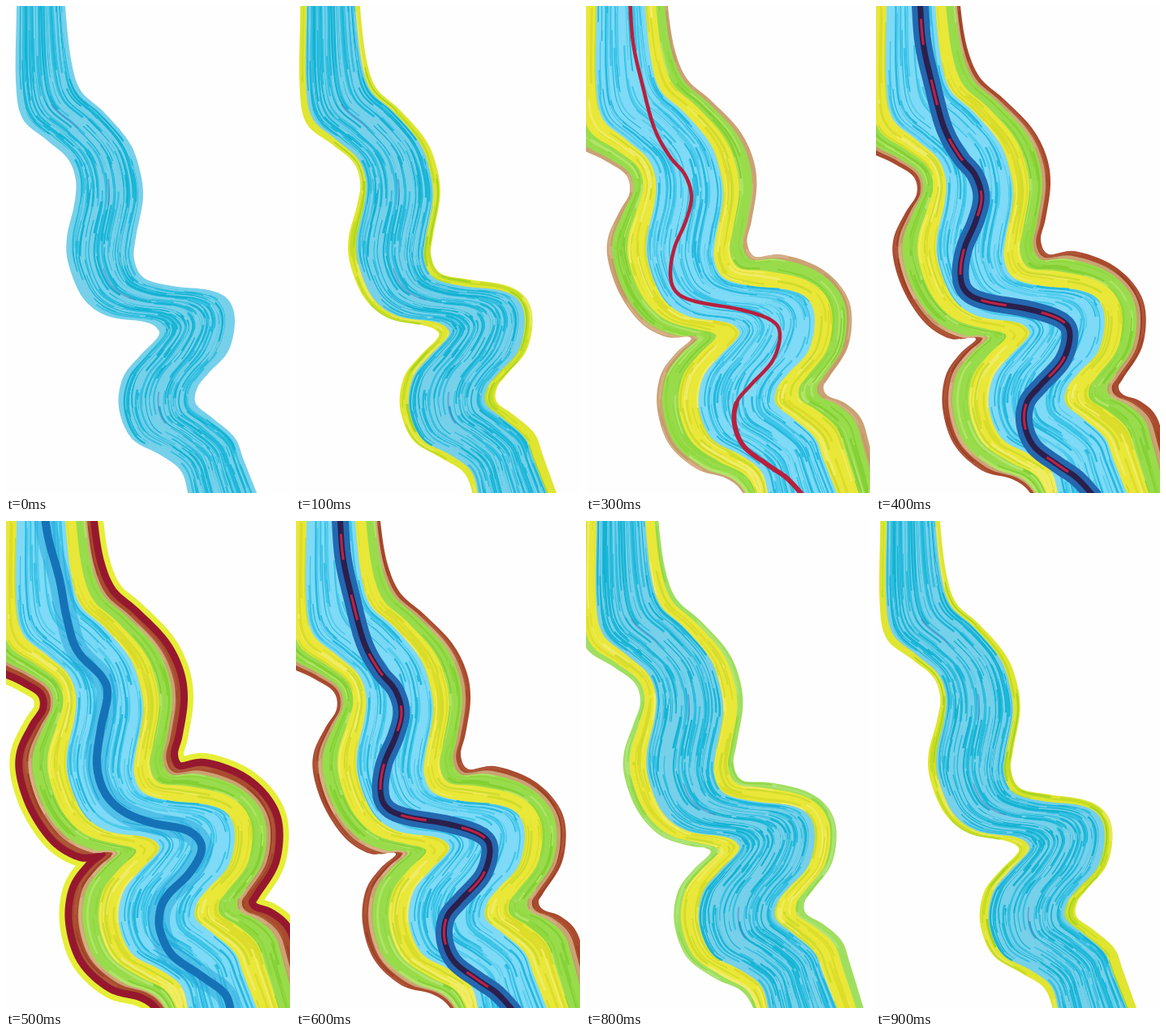
Recreate the animation shown at these times as an HTML page with a canvas. Size 350 px wide and 600 px high, loop 1000 ms.

```html
<!DOCTYPE html>
<html>
<head>
<meta charset="utf-8">
<style>
html, body { margin: 0; height: 100%; overflow: hidden; background: #fefefe; }
canvas { display: block; }
</style>
</head>
<body>
<canvas id="stage" width="350" height="600"></canvas>
<script>
const W = 350, H = 600;

// Smooth curve through x,y pairs, sampled at 8 steps per span.
function curve(...n) {
  const p = [], out = [];
  for (let i = 0; i < n.length; i += 2) p.push([n[i], n[i + 1]]);
  const last = p.length - 1;
  for (let i = 0; i < last; i++) {
    const a = p[Math.max(i - 1, 0)], b = p[i], c = p[i + 1], d = p[Math.min(i + 2, last)];
    for (let k = 0; k < 8; k++) {
      const t = k / 8;
      out.push([0, 1].map(j => b[j] + t / 2 * (c[j] - a[j] +
        t * (2 * a[j] - 5 * b[j] + 4 * c[j] - d[j] + t * (3 * (b[j] - c[j]) + d[j] - a[j])))));
    }
  }
  out.push(p[last]);
  return out;
}

// River banks and the matching points on the outer rim of the land.
const left = curve(12,-40, 13,0, 12,90, 20,138, 50,165, 76,188, 86,215, 84,245, 75,285, 77,318,
  95,360, 125,382, 170,389, 186,397, 187,408, 164,432, 144,458, 139,495, 155,533, 190,553,
  215,572, 224,600, 228,640);
const right = curve(72,-40, 73,0, 80,65, 92,104, 120,130, 150,165, 163,195, 169,235, 160,285, 158,312,
  170,335, 205,345, 250,350, 274,362, 282,388, 274,425, 250,452, 236,470, 234,490, 255,508,
  282,532, 294,562, 325,640);
const leftRim = curve(-28,-40, -28,20, -28,130, -18,172, 20,193, 46,210, 50,232, 36,255, 22,285, 22,315,
  36,355, 62,392, 92,410, 112,408, 123,411, 104,428, 86,455, 82,495, 96,540, 130,572,
  168,583, 190,600, 210,640);
const rightRim = curve(102,-40, 104,0, 112,50, 128,88, 158,115, 192,150, 210,185, 215,220, 209,262, 203,288,
  213,306, 245,302, 288,317, 318,343, 332,375, 328,420, 305,458, 299,469, 305,479, 326,487,
  345,505, 356,540, 380,640);
const thread = curve(54,-10, 58,45, 69,95, 84,150, 103,185, 122,208, 130,235, 123,265, 109,298, 104,330,
  111,352, 135,364, 190,374, 228,387, 239,405, 230,437, 203,467, 186,488, 183,515, 195,543,
  225,566, 248,582, 270,606);
const channel = curve(47,-10, 53,25, 66,72, 75,120, 88,160, 118,192, 125,215, 117,255, 112,300, 122,335,
  145,358, 180,372, 220,380, 238,393, 240,410, 225,435, 200,460, 190,480, 190,505, 205,535,
  240,560, 270,583, 278,610);

const yellow = ['#e9e738', '#dcdc2a', '#f0ec66', '#cfdc2c'];
const green = ['#98dc4c', '#84d034', '#b2e468', '#8ed83e'];
const paleGreen = ['#9fdf60', '#92d848', '#aee478'];
const lime = ['#dfe530', '#a4d422', '#e8e858', '#c4dc24'];
const tan = ['#cba274', '#c4986a', '#d6b084'];
const brown = ['#a94b2e', '#9e4028', '#b0563a'];
const land = [[.43, yellow], [.78, green]];

// Each scene: land bands from the water outwards, water colours, extras.
const deep = ['#76d0ea', '#14b2d2', '#1cb8da', '#36bfe0'];
const bright = ['#7edaf6', '#26b8de', '#3cc4e8', '#52ccec'];
const scenes = [
  { bands: [], water: deep, margin: .08, count: 430 },
  { bands: [[.19, lime]], water: deep, margin: .03, count: 430 },
  { bands: [[.38, yellow], [.53, paleGreen]], water: deep, margin: .03, count: 380 },
  { bands: [...land, [.9, tan]], water: bright, margin: .03, count: 330 },
  { bands: [...land, [.87, tan], [1, brown]], water: bright, margin: .03, count: 270 },
  { bands: [...land, [.87, tan], [1, brown]], water: bright, margin: .03, count: 270,
    rims: [[16, '#e6ee36'], [9, '#96182f']] }
];

let seed;
const rnd = () => (seed = seed * 16807 % 2147483647) / 2147483647;
const pick = a => a[Math.floor(rnd() * a.length)];
const mix = (a, b, t, from = 0, to = a.length, drift = 0) =>
  a.slice(from, to).map((p, i) => {
    const u = t + drift * i, q = b[i + from];
    return [p[0] + (q[0] - p[0]) * u, p[1] + (q[1] - p[1]) * u];
  });

function trace(g, pts) {
  g.beginPath();
  for (const p of pts) g.lineTo(p[0], p[1]);
}

function line(g, pts, color, width) {
  trace(g, pts);
  g.strokeStyle = color;
  g.lineWidth = width;
  g.stroke();
}

function shape(g, t, color) {
  trace(g, [...mix(left, leftRim, t), ...mix(right, rightRim, t).reverse()]);
  g.closePath();
  g.fillStyle = color;
  g.fill();
}

// Short pen strokes that follow the flow between two edges.
function strokes(g, a, b, lo, hi, colors, count, size) {
  for (let i = 0; i < count; i++) {
    const from = Math.floor(rnd() * (a.length + 10)) - 10;
    const to = from + 7 + Math.floor(rnd() * 17);
    const t = lo + rnd() * (hi - lo);
    const drift = (rnd() - .5) * .003;
    line(g, mix(a, b, t, Math.max(from, 0), to, drift), pick(colors), size * (.6 + rnd() * .8));
  }
}

function paint(s, k) {
  const c = document.createElement('canvas');
  c.width = W;
  c.height = H;
  const g = c.getContext('2d');
  g.lineJoin = 'round';
  g.fillStyle = '#fefefe';
  g.fillRect(0, 0, W, H);
  seed = 4711;

  for (const [width, color] of s.rims || []) {
    shape(g, 1, color);
    g.closePath();
    g.strokeStyle = color;
    g.lineWidth = width * 2;
    g.stroke();
  }
  for (let i = s.bands.length - 1; i >= 0; i--) {
    const [t, colors] = s.bands[i], inner = i ? s.bands[i - 1][0] : 0;
    shape(g, t, colors[0]);
    const count = Math.round((t - inner) * 180);
    strokes(g, left, leftRim, inner, t - .03, colors, count, 2.4);
    strokes(g, right, rightRim, inner, t - .03, colors, count, 2.4);
  }

  seed = k < 3 ? 99 : 77;
  shape(g, 0, s.water[0]);
  strokes(g, left, right, s.margin, 1 - s.margin, s.water.slice(1), s.count, 2);
  strokes(g, left, right, s.margin, 1 - s.margin, [s.water[0]], s.count / 3, 1.4);

  if (k < 3) {
    g.globalAlpha = .45;
    for (const [from, to] of [[24, 34], [50, 58], [74, 88], [134, 146]])
      line(g, mix(left, right, .5, from, to), '#4a76bc', 2);
    g.globalAlpha = 1;
  } else if (k == 3) {
    line(g, thread, '#b8203f', 4.5);
    line(g, thread.slice(136), '#b8203f', 6);
  } else if (k == 4) {
    line(g, thread, '#2368b0', 21);
    line(g, thread, '#2b1f4c', 7);
    g.setLineDash([32, 44]);
    g.lineDashOffset = 50;
    line(g, thread, '#c02244', 3);
  } else {
    g.globalAlpha = .5;
    line(g, channel, '#22a8dc', 27);
    g.globalAlpha = 1;
    line(g, channel, '#1672b6', 10);
  }
  return c;
}

const pictures = scenes.map(paint);
const view = document.getElementById('stage').getContext('2d');

function draw(now) {
  const i = Math.floor(now / 100) % 10;
  view.drawImage(pictures[Math.min(i, 10 - i)], 0, 0);
  requestAnimationFrame(draw);
}
draw(0);
</script>
</body>
</html>
```
